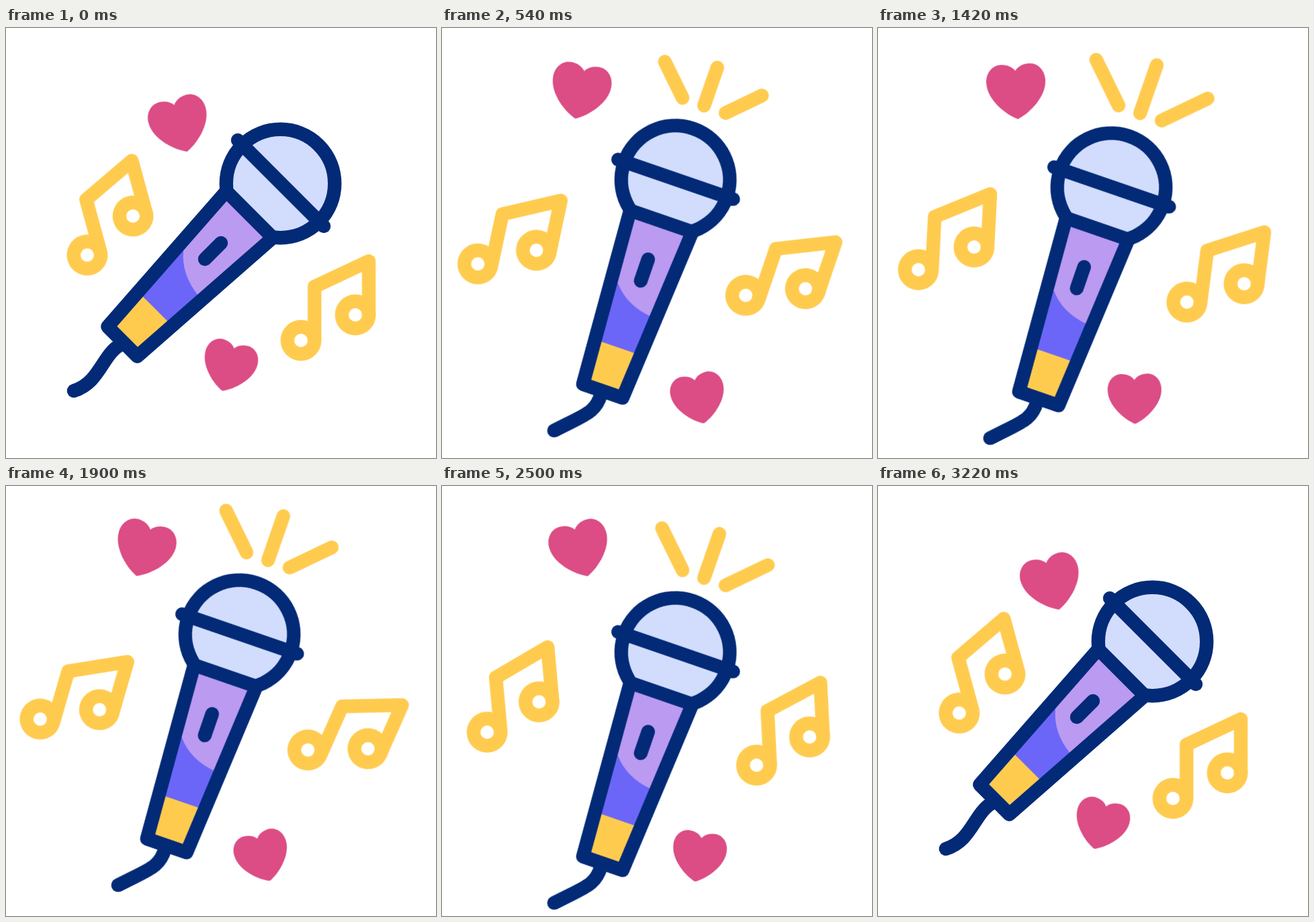
These frames come from a looping animation (640 by 640 pixels, 3.4 s). An HTML page:

```html
<!DOCTYPE html>
<html lang="en">
<head>
<meta charset="utf-8">
<title>Singing microphone</title>
<style>
  html, body { margin: 0; width: 100%; height: 100%; overflow: hidden; background: #fff; }
  svg { display: block; width: 100vw; height: 100vh; }

  :root { --navy: #022a77; --gold: #ffcb4f; --pink: #dc4c85; }

  .line { fill: none; stroke-width: 20.4; stroke-linecap: round; stroke-linejoin: round; }
  .navy { stroke: var(--navy); }
  .gold { stroke: var(--gold); }

  .sway, .cable, .ray {
    animation: sway 3400ms cubic-bezier(.3333, 0, .6667, 1) infinite;
  }
  .cable { animation-name: bend; }
  .ray { animation-name: flash; stroke-dasharray: 100 400; }

  /* Each part swings between an upper and a lower pose, and rests in between loops. */
  #mic {
    --rest: translate(295px, 345.5px) rotate(0deg);
    --up: translate(295.5px, 367.2px) rotate(-26deg);
    --down: translate(295.5px, 405.7px) rotate(-26deg);
  }
  #noteL {
    --rest: translate(154.5px, 278px) rotate(-15.3deg);
    --up: translate(110.8px, 313.3px) rotate(20.9deg);
    --down: translate(110.8px, 313.3px) rotate(-10.1deg);
  }
  #noteR {
    --rest: translate(479.5px, 416px) rotate(0deg);
    --up: translate(506.2px, 364.6px) rotate(29.9deg);
    --down: translate(506.2px, 364.6px) rotate(-9.1deg);
  }
  #heartL {
    --rest: translate(258.7px, 144.5px) rotate(-15.5deg);
    --up: translate(206px, 94.7px) rotate(23.8deg);
    --down: translate(206px, 94.7px) rotate(-23deg);
  }
  #heartR {
    --rest: translate(332px, 504.2px) rotate(15.5deg);
    --up: translate(382.1px, 552px) rotate(-22.3deg);
    --down: translate(382.1px, 552px) rotate(14.3deg);
  }

  @keyframes sway {
    0%, 94.412%, 100% { transform: var(--rest); }
    11.765%, 35.294%, 58.824%, 82.353% { transform: var(--up); }
    23.529%, 47.059%, 70.588% { transform: var(--down); }
  }
  @keyframes bend {
    0%, 94.412%, 100% { d: path("M171 471C143 486 140 528 101 540"); }
    11.765%, 82.353% { d: path("M169.5 469C149.5 491.8 134.2 486.5 82.4 487.7"); }
  }
  /* Rays grow from the inside, pulse, then shrink towards their tips. */
  @keyframes flash {
    0%, 11.765% { stroke-dashoffset: 102; }
    17.647%, 29.412%, 41.176%, 52.941%, 64.706%, 76.471%, 88.235% { stroke-dashoffset: 0; }
    23.529%, 35.294%, 47.059%, 58.824%, 70.588%, 82.353% { stroke-dashoffset: 17.8; }
    94.412%, 100% { stroke-dashoffset: -102; }
  }
</style>
</head>
<body>
<svg viewBox="0 0 640 640">
  <defs>
    <path id="heart" fill="#dc4c85" d="M0 41C-18 33-44 10-44-15C-44-30-34-41-21-41C-12-41-4-37 0-31C4-37 12-41 21-41C34-41 44-30 44-15C44 10 18 33 0 41Z"/>
    <g id="note" class="line gold">
      <circle cx="-40.5" cy="49" r="20.2"/>
      <circle cx="40.5" cy="11" r="20.2"/>
      <path d="M-20.3 49V-31L60.5-69V11"/>
    </g>
  </defs>

  <g id="heartL" class="sway"><use href="#heart"/></g>
  <g id="heartR" class="sway"><use href="#heart" transform="scale(.91)"/></g>
  <g id="noteL" class="sway"><use href="#note" x="-7.7"/></g>
  <g id="noteR" class="sway"><use href="#note"/></g>

  <g id="mic" class="sway">
    <g transform="translate(-295 -345.5)">
      <g class="line gold" transform="translate(408.5 231.5) rotate(26)">
        <path class="ray" pathLength="100" d="M10.5-122l-33.5-68.5"/>
        <path class="ray" pathLength="100" d="M42.5-110.5l25-72"/>
        <path class="ray" pathLength="100" d="M74.5-99.5l69-33"/>
      </g>
      <path class="cable line navy" d="M171 471C143 486 140 528 101 540"/>
      <circle class="line navy" cx="408.5" cy="231.5" r="80.7" style="fill:#d2ddfd"/>
      <path class="line navy" d="M345 167L473 295"/>
      <path fill="#bb9af1" d="M327.9 242.9L397.1 312.1L195.5 488.7L151.3 444.5Z"/>
      <path fill="#6b66f8" d="M264 332Q261 367 286 398L294 405L195.5 488.7L151.3 444.5L250 332Z"/>
      <path fill="#ffcb4f" d="M196.7 392.7L247.3 443.3L195.5 488.7L151.3 444.5Z"/>
      <path class="line navy" d="M327.9 242.9L397.1 312.1L195.5 488.7L151.3 444.5Z"/>
      <path class="line navy" d="M296 344L320 320"/>
    </g>
  </g>
</svg>
</body>
</html>
```
